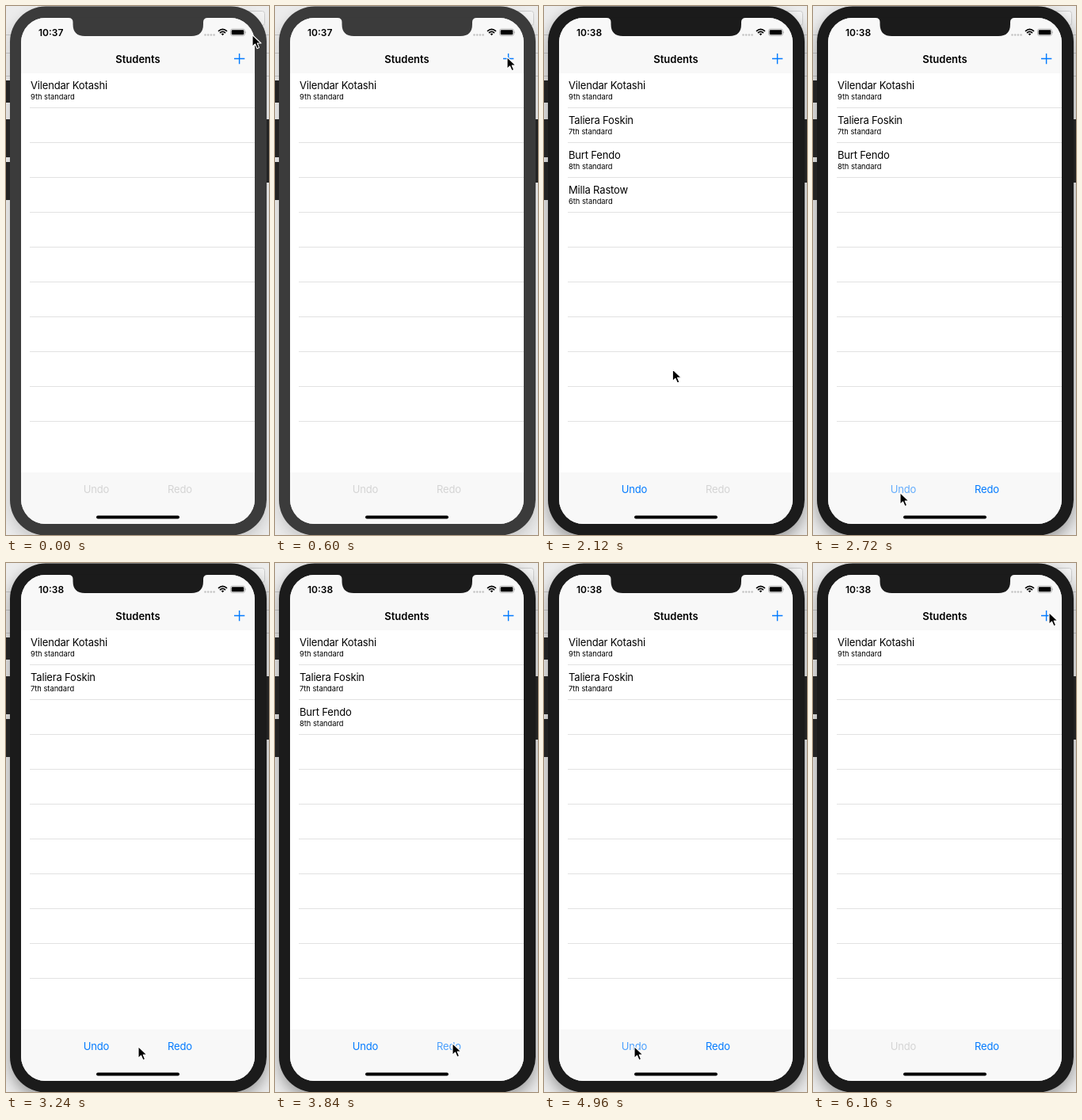
An HTML page that plays this animation: 332x668 px, repeating every 6.56 s.

```html
<!DOCTYPE html>
<html lang="en">
<head>
<meta charset="utf-8">
<title>Students</title>
<style>
  html, body { margin: 0; width: 100%; height: 100%; overflow: hidden; background: #ececec; }
  svg { display: block; width: 100vw; height: 100vh; }
  text { font-family: Inter, Roboto, "Liberation Sans", sans-serif; font-size: 13px; letter-spacing: -.17px; fill: #000; }
  .clock { font-size: 12px; font-weight: 600; letter-spacing: 0; }
  .title { font-size: 13px; font-weight: 600; letter-spacing: 0; text-anchor: middle; }
  .grade { font-size: 9.3px; letter-spacing: 0; }
  .button { text-anchor: middle; }
  .bezel { fill: var(--bezel); }
</style>
</head>
<body>
<svg id="stage" viewBox="0 0 332 668">
  <defs>
    <clipPath id="screen"><rect x="19" y="15" width="295" height="639" rx="31"/></clipPath>
    <filter id="blur" x="-20%" y="-20%" width="140%" height="140%"><feGaussianBlur stdDeviation="9"/></filter>
  </defs>

  <rect width="332" height="668" fill="#ececec"/>
  <rect x="240" y="6.500" width="86.500" height="18" rx="3" fill="#f3f3f3" stroke="#cdcdcd"/>
  <path d="M0 36.500H332M0 59.500H332M0 88.500H332" stroke="#c6c6c6"/>
  <rect id="shadow" x="5" y="8" width="324" height="668" rx="45" filter="url(#blur)"/>

  <path d="M0 94h6v28h-6zM0 143h6v48h-6zM0 197h6v48h-6zM328 143h4v80h-4z" fill="#232323"/>
  <rect class="bezel" x="5" y=".5" width="324" height="668" rx="45"/>

  <g clip-path="url(#screen)">
    <rect x="19" y="15" width="295" height="639" fill="#fff"/>
    <rect x="19" y="15" width="295" height="70" fill="#f8f8f8"/>
    <rect x="19" y="589" width="295" height="65" fill="#f8f8f8"/>
    <path id="lines" stroke="#e2e2e2"/>
    <g id="rows"></g>
  </g>
  <path class="bezel" d="M79 14.500V15q5.500 0 5.500 5.500V23q0 15 15 15H234q15 0 15-15V20.500q0-5.500 5.500-5.500V14.500z"/>

  <text id="clock" class="clock" x="41" y="37.500"></text>
  <g fill="#c4c4c4">
    <circle cx="251.500" cy="36.500" r="1.300"/><circle cx="255.200" cy="36.500" r="1.300"/>
    <circle cx="258.900" cy="36.500" r="1.300"/><circle cx="262.600" cy="36.500" r="1.300"/>
  </g>
  <g fill="none" stroke="#000" stroke-width="1.700">
    <path d="M268 31.800q5.500-5 11 0M270 34q3.500-3.200 7 0"/>
    <path d="M271.700 35.300q1.800-1.500 3.600 0l-1.800 2z" fill="#000" stroke="none"/>
  </g>
  <rect x="283.500" y="29" width="18" height="8.500" rx="2.400" fill="#f8f8f8" stroke="#aaa" stroke-width=".8"/>
  <rect x="284.700" y="30.200" width="15.600" height="6.100" rx="1.300"/>
  <path d="M302.400 31.800q1.400 1.400 0 3z" fill="#999"/>

  <text class="title" x="166.500" y="71.500">Students</text>
  <path id="plus" d="M288 66.500H301.300M294.600 60V73.300" stroke="#007aff" stroke-width="1.400"/>
  <text id="undo" class="button" x="114" y="614.700">Undo</text>
  <text id="redo" class="button" x="219.500" y="614.700">Redo</text>
  <rect x="114" y="643.500" width="105" height="4" rx="2"/>

  <path id="cursor" d="M0 .5V15.300L3.500 12 6 17.700 8.600 16.600 6.200 11H11z" fill="#000" stroke="#fff" stroke-width="1.100" stroke-linejoin="round"/>
</svg>

<script>
const LOOP = 6560, STEP = 40, ROW = 44;
const $ = id => document.getElementById(id);

const students = [
  ["Vilendar Kotashi", "9th standard"],
  ["Taliera Foskin", "7th standard"],
  ["Burt Fendo", "8th standard"],
  ["Milla Rastow", "6th standard"]
];

// [time, number of students listed]
const counts = [
  [0, 1], [880, 2], [1200, 3], [1520, 4], [2640, 3], [2920, 2],
  [3600, 3], [3920, 4], [4600, 3], [4800, 2], [5000, 1]
];

// [press, release, fade back]
const taps = {
  plus: [[720, 880, 200], [1120, 1200, 120], [1320, 1520, 0]],
  undo: [[2480, 2640, 240], [2800, 2920, 120]  , [4520, 4600, 200], [4720, 4800, 120], [4920, 5000, 0]],
  redo: [[3480, 3600, 200], [3800, 3920, 0]]
};

// [time, x, y] of the pointer tip
const path = [
  [0, 311, 36], [160, 316, 19], [600, 293, 64], [1680, 293, 64],
  [2360, 110, 616], [2560, 110, 614], [3040, 110, 614], [3440, 224, 606],
  [3960, 224, 606], [4360, 114, 610], [5320, 114, 610], [5360, 160, 560],
  [5400, 215, 490], [5720, 329, 28], [6160, 298, 62]
];

const clamp = v => Math.max(0, Math.min(1, v));
const smooth = v => v * v * (3 - 2 * v);

$("lines").setAttribute("d", Array.from({ length: 10 }, (_, i) => `M30 ${128.5 + i * ROW}H314`).join(""));
$("rows").innerHTML = students.map(([name, grade], i) =>
  `<g><text x="31" y="${104.5 + i * ROW}">${name}</text>` +
  `<text class="grade" x="31" y="${118 + i * ROW}">${grade}</text></g>`).join("");
const rows = [...$("rows").children];

function pointer(t) {
  const next = path.findIndex(p => p[0] > t);
  if (next < 0) return path[path.length - 1].slice(1);
  const [t0, x0, y0] = path[next - 1], [t1, x1, y1] = path[next];
  const k = smooth((t - t0) / (t1 - t0));
  return [x0 + (x1 - x0) * k, y0 + (y1 - y0) * k];
}

function opacity(button, t) {
  const dims = taps[button].map(([press, release, fade]) => {
    if (t < press || t >= release + fade) return 0;
    return t < release ? clamp((t - press) / 80) : 1 - (t - release) / fade;
  });
  return 1 - 0.6 * Math.max(...dims);
}

function setButton(id, enabled, t) {
  $(id).style.fill = enabled ? "#007aff" : "#d4d4d4";
  $(id).style.opacity = enabled ? opacity(id, t) : 1;
}

function draw(t) {
  const focused = t >= 720;
  const count = counts.filter(c => c[0] <= t).pop()[1];

  $("stage").style.setProperty("--bezel", focused ? "#1b1b1b" : "#3b3b3b");
  $("shadow").style.opacity = focused ? 0.35 : 0.16;
  $("clock").textContent = t < 2000 ? "10:37" : "10:38";
  rows.forEach((row, i) => { row.style.display = i < count ? "" : "none"; });

  $("plus").style.opacity = opacity("plus", t);
  setButton("undo", count > 1, t);
  setButton("redo", t >= 2640 && count < students.length, t);

  const [x, y] = pointer(t);
  $("cursor").setAttribute("transform", `translate(${x.toFixed(1)} ${y.toFixed(1)})`);
  $("cursor").style.display = t >= 5440 && t < 5720 ? "none" : "";
}

const start = performance.now();
function tick() {
  const t = (performance.now() - start) % LOOP;
  draw(Math.floor(t / STEP) * STEP);
  requestAnimationFrame(tick);
}
tick();
</script>
</body>
</html>
```
